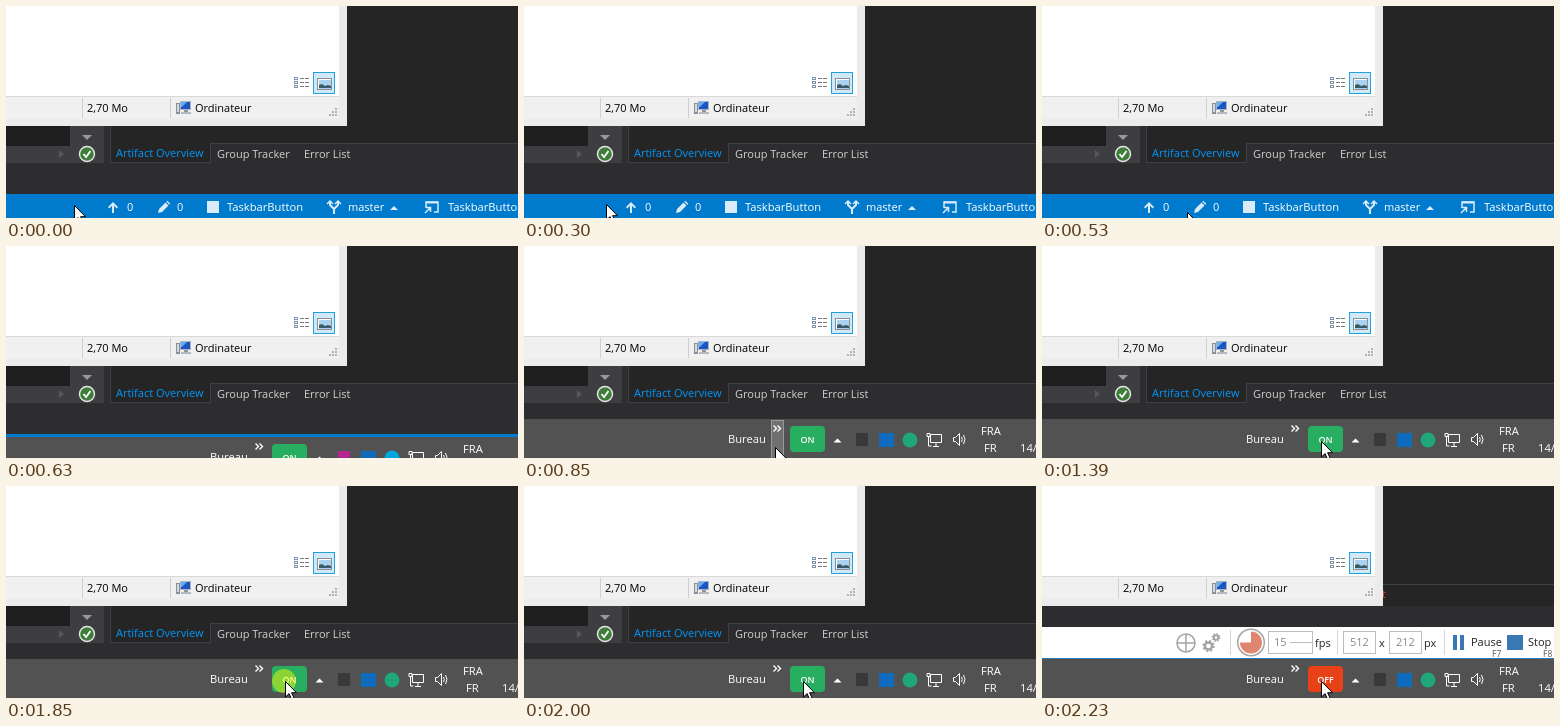
Recreate the animation shown at these times as an HTML page. Size 512 px wide and 212 px high, loop 3890 ms.

```html
<!DOCTYPE html>
<html lang="fr">
<head>
<meta charset="utf-8">
<title>Taskbar toggle</title>
<style>
html, body { margin: 0; width: 100%; height: 100%; overflow: hidden; background: #2d2d30; }
svg { display: block; width: 512px; height: 212px; }
text { font: 11px "Open Sans", "Noto Sans", sans-serif; }
rect { shape-rendering: crispEdges; }
.soft { shape-rendering: auto; }
.light { fill: #fff; }
.line { fill: none; stroke: #fff; }
.small { font-size: 8.5px; fill: #555; }
.tray text { font-size: 11.2px; font-weight: 500; }
</style>
</head>
<body>
<svg viewBox="0 0 512 212">
  <rect width="512" height="212" fill="#2d2d30"/>
  <rect x="340" width="172" height="137" fill="#252526"/>

  <g id="editor">
    <rect y="120" width="64" height="20" fill="#1e1e1e"/>
    <rect y="140" width="64" height="17" fill="#3e3e42"/>
    <rect x="64" y="120" width="34" height="37" fill="#3e3e42"/>
    <path d="M76 129h10l-5 5z" fill="#999"/>
    <path d="M53 144v8l5-4z" fill="#58585c"/>
    <circle cx="81" cy="148" r="7.5" fill="#3f7d3a" stroke="#e8e8e8" stroke-width="1.4"/>
    <path d="M77.5 148l2.6 3 4.4-6" class="line" stroke-width="1.8"/>
    <rect x="104" y="120" width="408" height="18" fill="#3f3f46"/>
    <rect x="105" y="120" width="407" height="17" fill="#252526"/>
    <rect x="104" y="137" width="101" height="20" fill="#3f3f46"/>
    <rect x="105" y="137" width="99" height="19" fill="#252526"/>
    <text x="110" y="151" fill="#0097fb">Artifact Overview</text>
    <text x="211" y="152" fill="#d0d0d0">Group Tracker</text>
    <text x="298" y="152" fill="#d0d0d0">Error List</text>
  </g>

  <g id="status">
    <rect y="188" width="512" height="24" fill="#007acc"/>
    <g fill="#d9ebf8">
      <path d="M107 196l5 5-1.4 1.4-2.6-2.6v7.2h-2v-7.2l-2.6 2.6-1.4-1.4z"/>
      <path d="M152 207l1-4 6.500-6.500 3 3-6.500 6.500zM160.300 195.700l1-1 3 3-1 1z"/>
      <rect x="201" y="195" width="12" height="12"/>
      <path d="M384 204h8l-4-4z"/>
    </g>
    <g fill="none" stroke="#d9ebf8" stroke-width="2">
      <path d="M328 208v-5l-4-4v-3M328 203l4-4v-3"/>
      <path d="M321 198l3-3 3 3M329 198l3-3 3 3" stroke-width="1.5"/>
      <path d="M420 202v-6h12v10h-4M419 207l5-5m-4-0.500h4.500v4.500" stroke-width="1.5"/>
      <path d="M420 196.500h12"/>
    </g>
    <g class="light">
      <text x="121" y="205">0</text>
      <text x="171" y="205">0</text>
      <text x="221" y="205" style="font-size:11.200px">TaskbarButton</text>
      <text x="342" y="205">master</text>
      <text x="442" y="205" style="font-size:11.200px">TaskbarButton</text>
    </g>
  </g>

  <g id="recorder">
    <rect x="340" y="98" width="172" height="1" fill="#3f3f46"/>
    <rect x="340" y="99" width="172" height="22" fill="#252526"/>
    <rect y="120" width="512" height="21" fill="#2d2d30"/>
    <text x="340" y="112" fill="#e0443a">t</text>
    <rect y="141" width="512" height="31" fill="#fff"/>
    <rect y="172" width="512" height="1" fill="#2a7ab8"/>
    <g fill="none" stroke="#a4a4a4" stroke-width="1.500">
      <circle cx="144" cy="157" r="9"/>
      <path d="M135 157h18M144 148v18"/>
      <circle cx="166.500" cy="160" r="3.600" stroke-width="2.500"/>
      <circle cx="166.500" cy="160" r="5.300" stroke-width="1.600" stroke-dasharray="2.100 2.060"/>
      <circle cx="174" cy="151.500" r="2.200" stroke-width="2"/>
      <circle cx="174" cy="151.500" r="3.700" stroke-width="1.400" stroke-dasharray="1.500 1.400"/>
    </g>
    <g fill="#d5d5d5">
      <rect x="188" y="144" width="1" height="25"/>
      <rect x="295" y="144" width="1" height="25"/>
      <rect x="402" y="144" width="1" height="25"/>
    </g>
    <circle cx="209" cy="156.500" r="13.300" fill="#fff" stroke="#a9a3a1" stroke-width="1.500"/>
    <path d="M209 156.500v-11a11 11 0 1 1-11 11z" fill="#df8570"/>
    <g fill="#fff" stroke="#bdbdbd">
      <rect x="226.500" y="145.500" width="44" height="22"/>
      <rect x="301.500" y="145.500" width="32" height="22"/>
      <rect x="347.500" y="145.500" width="32" height="22"/>
      <path d="M248 156.500h22"/>
    </g>
    <g fill="#888">
      <text x="232" y="160">15</text>
      <text x="308" y="160">512</text>
      <text x="354" y="160">212</text>
    </g>
    <g fill="#222">
      <text x="273" y="161">fps</text>
      <text x="337" y="161">x</text>
      <text x="382" y="161">px</text>
      <text x="429" y="160">Pause</text>
      <text x="486" y="160">Stop</text>
    </g>
    <text x="450" y="171" class="small">F7</text>
    <text x="501" y="171" class="small">F8</text>
    <g fill="#3a78b5">
      <rect x="411" y="149" width="4" height="15"/>
      <rect x="418" y="149" width="4" height="15"/>
      <rect x="465" y="149" width="16" height="15"/>
    </g>
  </g>

  <g id="dialog">
    <rect width="341" height="120" fill="#ebebeb"/>
    <rect width="333" height="90" fill="#fff"/>
    <rect y="90" width="333" height="23" fill="#f0f0f0"/>
    <rect y="90" width="333" height="1" fill="#d9d9d9"/>
    <rect x="76" y="92" width="1" height="20" fill="#cfcfcf"/>
    <rect x="164" y="92" width="1" height="20" fill="#cfcfcf"/>
    <text x="81" y="106">2,70 Mo</text>
    <text x="189" y="106">Ordinateur</text>
    <rect x="174" y="95" width="11" height="9" fill="#aab4c0"/>
    <rect x="175" y="96" width="9" height="7" fill="#1b55c4"/>
    <path d="M175 96h6l-5 5h-1z" fill="#62aef2"/>
    <rect x="178" y="104" width="4" height="2" fill="#8d959e"/>
    <rect x="175" y="106" width="10" height="2" fill="#b4bac2"/>
    <rect x="170" y="97" width="4" height="11" fill="#87919c"/>
    <rect x="171" y="98" width="2" height="8" fill="#d4dae0"/>
    <g id="details"></g>
    <rect x="307.500" y="66.500" width="21" height="21" fill="#cfe9f8" stroke="#26a0da"/>
    <rect x="311.500" y="72.500" width="14" height="11" fill="#fff" stroke="#8a8f94"/>
    <rect x="313" y="74" width="12" height="9" fill="#a9d3f0"/>
    <path d="M313 82v-3l3-1 3 2 3-1 3 1v2z" fill="#3b5a68"/>
    <g id="grip" fill="#b2b2b2"></g>
  </g>

  <g id="taskbar" class="tray">
    <rect y="173" width="512" height="40" fill="#525252"/>
    <g class="light">
      <text x="204" y="197">Bureau</text>
      <text x="457" y="189">FRA</text>
      <text x="460" y="206">FR</text>
      <text x="496" y="206">14/</text>
      <path d="M309.500 196.500h8l-4-4z"/>
    </g>
    <rect id="hover" x="247.500" y="174.500" width="12" height="39" fill="#707070" stroke="#999"/>
    <path d="M249.500 179.500l3 3-3 3M253.500 179.500l3 3-3 3" class="line" stroke-width="1.400"/>
    <rect id="button" class="soft" x="266" y="180" width="35" height="26" rx="4"/>
    <text id="label" x="283.500" y="196.500" text-anchor="middle" class="light" style="font-size:9px;font-weight:600"></text>
    <rect id="app" x="332" y="187" width="12" height="13"/>
    <rect x="355" y="187" width="15" height="14" fill="#0f6cbd"/>
    <circle id="chat" cx="386" cy="194" r="7.500"/>
    <g class="line">
      <path d="M406.500 188.500h11v8h-11zM412 197v3M409 200.500h6M404.500 190v10h3M403 187.500h3v3h-3z"/>
      <path d="M429.500 191.500h2l4-4v12l-4-4h-2z"/>
      <path d="M437.500 191q1.500 2.500 0 5M439.500 189q3 4.500 0 9"/>
    </g>
  </g>

  <circle id="click" cx="278" cy="195" r="12" fill="#ff0" fill-opacity=".47"/>
  <path id="cursor" d="M.5.5v15.500l3.600-3.400 2.500 5.700 2.500-1.100-2.500-5.500h4.900z" fill="#fff" stroke="#000"/>
</svg>
<script>
const $ = id => document.getElementById(id);
const LOOP = 3890;

// [start ms, x, y] of the pointer tip
const pointer = [
  [0, 68, 199], [150, 71, 198], [230, 76, 198], [300, 82, 198], [390, 104, 201],
  [470, 145, 206], [550, 192, 211], [630, 232, 213], [700, 246, 211], [770, 250, 206],
  [850, 251, 201], [930, 254, 200], [1000, 261, 200], [1080, 267, 200],
  [1160, 271, 199], [1230, 274, 198], [1310, 277, 196], [1390, 279, 195]
];
// [start ms, distance below the resting place]
const slide = [[0, 40], [550, 32], [630, 18], [700, 6], [770, 0]];

const at = (steps, t) => steps.findLast(s => s[0] <= t);
const show = (id, on) => $(id).setAttribute("visibility", on ? "visible" : "hidden");
const move = (id, x, y) => $(id).setAttribute("transform", `translate(${x} ${y})`);
const paint = (id, color) => $(id).setAttribute("fill", color);
const box = (x, y, w, h, color) =>
  `<rect x="${x}" y="${y}" width="${w}" height="${h}"${color ? ` fill="${color}"` : ""}/>`;

let rows = "", dots = "";
for (let i = 0; i < 3; i++) {
  const y = 71 + i * 4;
  rows += box(288, y, 4, 3, "#7f93a8") + box(289, y + 1, 2, 1, "#fff") +
    box(294, y + 1, 4, 1, "#777") + box(299, y + 1, 4, 1, "#777");
  for (let j = 2 - i; j < 3; j++) dots += box(323 + j * 3, 102 + i * 3, 2, 2);
}
$("details").innerHTML = rows;
$("grip").innerHTML = dots;

function draw(t) {
  const [, x, y] = at(pointer, t);
  const off = t >= 2230;
  move("cursor", x, y);
  move("taskbar", 0, at(slide, t)[1]);
  show("hover", t >= 770 && t < 1000);
  show("click", t >= 1850 && t < 2000);
  show("editor", !off);
  show("recorder", off);
  paint("button", off ? "#e84118" : "#27ae60");
  $("label").textContent = off ? "OFF" : "ON";
  paint("app", t < 700 ? "#b5258f" : "#3b3838");
  paint("chat", t < 700 ? "#00a5dc" : "#1fa67a");
}

function tick() {
  draw(performance.now() % LOOP);
  requestAnimationFrame(tick);
}
tick();
</script>
</body>
</html>
```
